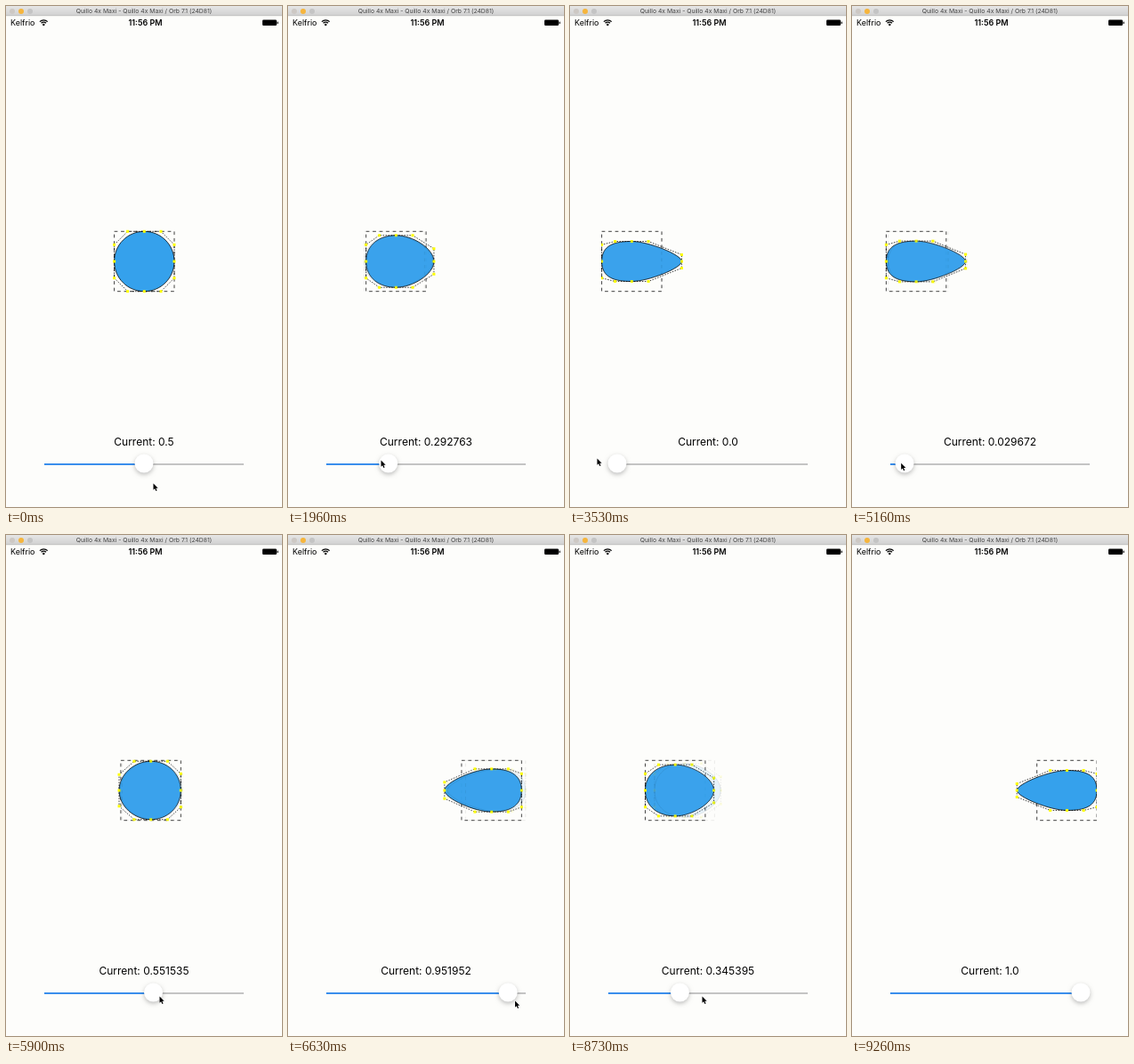
Recreate the animation shown at these times as an HTML page with a canvas. Size 310 px wide and 563 px high, loop 9.63 s.

```html
<!DOCTYPE html>
<html lang="en">
<head>
<meta charset="utf-8">
<title>Stretchy circle</title>
<style>
html, body { margin: 0; width: 310px; height: 563px; overflow: hidden; background: #fdfdfb; }
canvas { display: block; }
</style>
</head>
<body>
<canvas id="stage" width="310" height="563"></canvas>
<script>
const ctx = document.getElementById('stage').getContext('2d');
const LOOP = 9630, STEP = 100 / 3;
const SIDE = 67.4, MID_Y = 287, TRAVEL = 172.2;

// Hand movements: from, to (ms), then the cursor x, y and the slider value reached.
// Values past 0 or 1 are the hand overshooting the track.
const rest = [165, 536, .5];
const strokes = [
  [60, 500, 156, 516, .5],
  [960, 1960, 104, 510, .292763],
  [1960, 3530, 30, 508, 0],
  [4400, 4600, 48, 513, 0],
  [5030, 5960, 173.5, 518, .5582055],
  [6000, 6960, 285, 525, 1.1],
  [7260, 7600, 137, 508, .742325],
  [7600, 8100, 10, 513, -.03],
  [8430, 8730, 148, 518, .345395],
  [8730, 9260, 330, 518, 1.05]
];

// Ease in from a standstill, ease out to one, and pass through joined strokes
function ease(u, fromRest, toRest) {
  if (fromRest && toRest) return u * u * (3 - 2 * u);
  return fromRest ? u ** 1.5 : 1 - (1 - u) ** 1.5;
}

function poseAt(t) {
  let pose = rest;
  strokes.forEach(([from, to, ...goal], i) => {
    if (t <= from) return;
    const k = ease(Math.min(1, (t - from) / (to - from)),
      strokes[i - 1]?.[1] !== from, strokes[i + 1]?.[0] !== to);
    pose = pose.map((v, j) => v * (1 - k) + goal[j] * k);
  });
  const [x, y, value] = pose;
  return { x, y, value: Math.min(1, Math.max(0, value)) };
}

function text(str, x, y, font, color = '#000', align = 'center') {
  ctx.font = font + ' Inter, sans-serif';
  ctx.fillStyle = color;
  ctx.textAlign = align;
  ctx.fillText(str, x, y);
}

function disc(x, y, r, color) {
  ctx.fillStyle = color;
  ctx.beginPath();
  ctx.arc(x, y, r, 0, 7);
  ctx.fill();
}

function drawChrome() {
  const bar = ctx.createLinearGradient(0, 0, 0, 11);
  bar.addColorStop(0, '#e6e6e6');
  bar.addColorStop(1, '#d0d0d0');
  ctx.fillStyle = bar;
  ctx.fillRect(0, 0, 310, 11);
  ctx.fillStyle = '#b8b8b8';
  ctx.fillRect(0, 10.5, 310, .7);
  ['#cdc8c4', '#f6b53c', '#c4c4c4'].forEach((c, i) => disc(7 + i * 10, 6, 3, c));
  text('Quillo 4x Maxi - Quillo 4x Maxi / Orb 7.1 (24D81)', 155, 8.3, '6.8px', '#444');

  text('Kelfrio', 5, 22, '9px', '#000', 'left');
  text('11:56 PM', 156.5, 22, '600 9px');
  ctx.strokeStyle = '#000';
  ctx.lineWidth = 1.3;
  for (const r of [3.8, 6.2]) {
    ctx.beginPath();
    ctx.arc(42.3, 22, r, -Math.PI * .75, -Math.PI * .25);
    ctx.stroke();
  }
  disc(42.3, 21, 1.2, '#000');
  ctx.fillStyle = '#000';
  ctx.beginPath();
  ctx.roundRect(288, 15.5, 16, 6.5, 1.2);
  ctx.roundRect(304.5, 17.6, 1.2, 2.4, .5);
  ctx.fill();
}

function drawBlob(p, alpha) {
  const x = 155.3 - SIDE / 2 + (p - .5) * TRAVEL, y = MID_Y - SIDE / 2;
  const cx = x + SIDE / 2, off = SIDE / 3.6;
  const move = SIDE / 6 * Math.abs(p - .5) * 2;
  const pullR = p <= .5 ? move : 0, pullL = move - pullR;
  const top = y + move, bottom = y + SIDE - move;
  const right = x + SIDE + pullR * 2, left = x - pullL * 2;
  const offR = off - pullR, offL = off - pullL;
  const pts = [
    [cx, top], [cx + off, top], [right, MID_Y - offR],
    [right, MID_Y], [right, MID_Y + offR], [cx + off, bottom],
    [cx, bottom], [cx - off, bottom], [left, MID_Y + offL],
    [left, MID_Y], [left, MID_Y - offL], [cx - off, top]
  ];

  ctx.save();
  ctx.globalAlpha = alpha;
  ctx.beginPath();
  ctx.rect(35, 167, 240, 240);
  ctx.clip();
  ctx.strokeStyle = '#000';
  ctx.lineWidth = .75;
  ctx.setLineDash([3.75, 3.75]);
  ctx.strokeRect(x, y, SIDE, SIDE);

  ctx.setLineDash([]);
  ctx.fillStyle = '#35a1ec';
  ctx.beginPath();
  ctx.moveTo(...pts[0]);
  for (let i = 0; i < 12; i += 3)
    ctx.bezierCurveTo(...pts[i + 1], ...pts[i + 2], ...pts[(i + 3) % 12]);
  ctx.closePath();
  ctx.fill();
  ctx.stroke();

  ctx.setLineDash([1.5, 1.5]);
  ctx.beginPath();
  pts.forEach(q => ctx.lineTo(...q));
  ctx.closePath();
  ctx.stroke();
  ctx.fillStyle = '#ff0';
  pts.forEach(([px, py]) => ctx.fillRect(px - 1.5, py - 1.5, 3, 3));
  ctx.restore();
}

function drawSlider(p) {
  const label = p === 0 || p === 1 ? p.toFixed(1) : String(+p.toFixed(6));
  text('Current: ' + label, 155, 493.8, '12px');
  const knob = 53 + p * 204;
  ctx.fillStyle = '#b7b7b7';
  ctx.fillRect(43, 514.2, 224, 1.6);
  ctx.fillStyle = '#1a82f7';
  ctx.fillRect(43, 514.2, knob - 43, 1.6);
  ctx.save();
  ctx.shadowColor = 'rgba(0,0,0,.25)';
  ctx.shadowBlur = 5;
  ctx.shadowOffsetY = 2;
  disc(knob, 514, 10.5, '#fff');
  ctx.restore();
}

function drawCursor(x, y) {
  const arrow = [[0, 0], [0, 7.2], [1.7, 5.7], [2.9, 8.5], [4.1, 8], [2.9, 5.2], [5.2, 5.2]];
  ctx.beginPath();
  arrow.forEach(([dx, dy]) => ctx.lineTo(x + .5 + dx, y + .5 + dy));
  ctx.closePath();
  ctx.strokeStyle = '#fff';
  ctx.lineWidth = 1;
  ctx.stroke();
  ctx.fillStyle = '#000';
  ctx.fill();
}

function draw(now) {
  // Thirty pictures a second, on a 10 ms clock
  const step = Math.floor((now % LOOP + 9) / STEP);
  const t = Math.floor(step * 10 / 3) * 10;
  const { x, y, value } = poseAt(t);
  const previous = poseAt(t - STEP).value;

  ctx.fillStyle = '#fdfdfb';
  ctx.fillRect(0, 0, 310, 563);
  drawChrome();
  // Each new picture of the shape fades in over the one before
  const moving = value !== previous;
  drawBlob(previous, moving ? .97 : 1);
  if (moving) drawBlob(value, .1);
  drawSlider(value);
  drawCursor(x, y);
}

let start;
function tick(now) {
  start ??= now;
  draw(now - start);
  requestAnimationFrame(tick);
}
draw(0);
requestAnimationFrame(tick);
</script>
</body>
</html>
```
